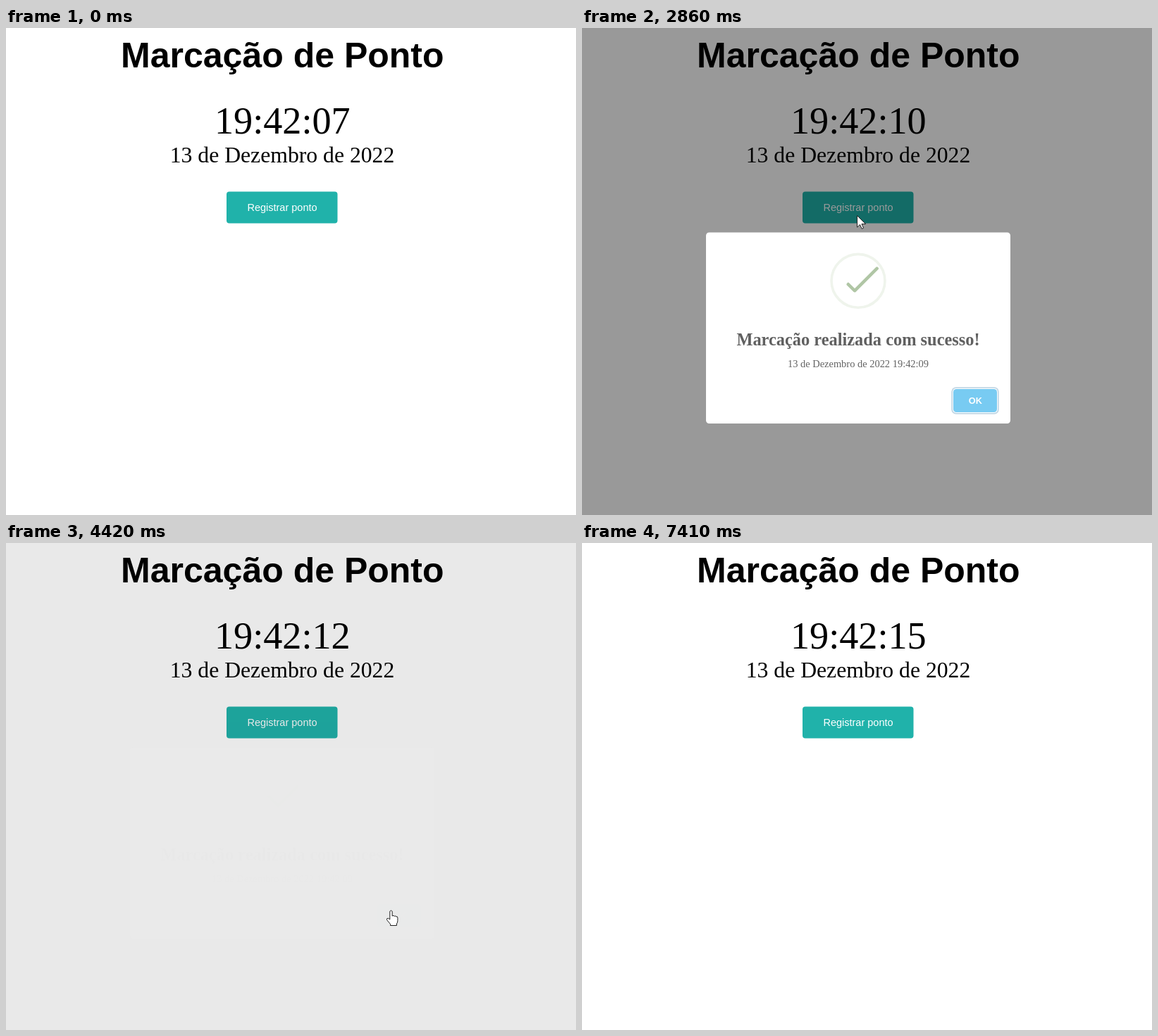
Write an HTML page that moves like this. It is 809 px wide and 692 px high and loops after 7.54 s.

```html
<!DOCTYPE html>
<html lang="pt">
<head>
<meta charset="utf-8">
<title>Marcação de Ponto</title>
<style>
  html, body { margin: 0; width: 100%; height: 100%; overflow: hidden; background: #fff; }
  svg { display: block; width: 809px; height: 692px; }
  text { text-anchor: middle; }
  .sans { font-family: "Liberation Sans", Arial, sans-serif; }
  .serif { font-family: "Liberation Serif", "Times New Roman", serif; }
  .bold { font-weight: bold; }
</style>
</head>
<body>
<svg viewBox="0 0 809 692">
  <text class="sans bold" x="392.3" y="56" font-size="50">Marcação de Ponto</text>
  <text class="serif" id="clock" x="392.3" y="150" font-size="54.2"></text>
  <text class="serif" x="392" y="191" font-size="31.7">13 de Dezembro de 2022</text>
  <rect id="button" x="313" y="232.5" width="157.5" height="45" rx="4"/>
  <text class="sans" x="392" y="260" font-size="14.5" fill="#fff">Registrar ponto</text>

  <g id="overlay">
    <rect width="809" height="692" fill-opacity=".4"/>
    <g id="modal">
      <rect x="176" y="290.5" width="432" height="271.5" rx="4.5" fill="#fff"/>
      <g transform="translate(392 359.3) scale(.904)">
        <circle r="42" fill="none" stroke="#b0c6a5" stroke-width="4"/>
        <g fill="#fff">
          <path d="M0-60A60 60 0 0 0 0 60Z" transform="translate(-13 13) rotate(-45)"/>
          <path id="cover" d="M0-60A60 60 0 0 1 0 60Z"/>
          <rect x="-5" y="-46" width="10" height="92" transform="translate(-10 12) rotate(-45)"/>
        </g>
        <circle r="42" fill="none" stroke="#eff4ec" stroke-width="4"/>
        <g fill="#b0c6a5">
          <rect id="tip" height="5" rx="2"/>
          <rect id="long" height="5" rx="2"/>
        </g>
      </g>
      <text class="serif bold" x="392" y="451" font-size="24.4" fill="#606060">Marcação realizada com sucesso!</text>
      <text class="serif" x="392" y="482" font-size="14.45" fill="#636363">13 de Dezembro de 2022 19:42:09</text>
      <rect x="524.3" y="510.3" width="67.4" height="38.4" rx="6.5" fill="#c2d7e5"/>
      <rect x="526.1" y="512.1" width="63.8" height="34.8" rx="5" fill="#fff"/>
      <rect x="527" y="513" width="62" height="33" rx="4.5" fill="#78cbf2"/>
      <text class="sans bold" x="558.3" y="534" font-size="12.7" fill="#fff">OK</text>
    </g>
  </g>

  <g id="cursor" fill="#fff" stroke="#222" stroke-linejoin="round">
    <path id="arrow" d="M0 0V16.5L4 12.8 6.6 18.7 9 17.6 6.4 11.9H12Z"/>
    <path id="hand" d="M-1.7 13V1.4Q0-1 1.7 1.4V8Q3.8 6.4 4.7 8.4Q6.6 7 7.3 9Q9.3 8.2 9.4 10.5V14.5Q9.4 17.5 8 19V21.5H-1V19.5L-6 13.5Q-6.6 11-3.8 11.3Z"/>
  </g>
</svg>
<script>
const LOOP = 7540, STEP = 130, OPEN = 2256, CLOSE = 4275;
const $ = id => document.getElementById(id);
const clamp = v => Math.min(1, Math.max(0, v));
const mix = (a, b, k) => a + (b - a) * k;

function bezier(x1, y1, x2, y2) {
  const at = (a, b, u) => 3 * a * u * (1 - u) ** 2 + 3 * b * u * u * (1 - u) + u ** 3;
  return x => {
    if (x <= 0) return 0;
    if (x >= 1) return 1;
    let lo = 0, hi = 1;
    for (let i = 0; i < 24; i++) {
      const mid = (lo + hi) / 2;
      if (at(x1, x2, mid) < x) lo = mid; else hi = mid;
    }
    return at(y1, y2, lo);
  };
}
const ease = bezier(.25, .1, .25, 1);
const easeIn = bezier(.42, 0, 1, 1);
const easeInOut = bezier(.42, 0, .58, 1);

// Rows are [position, ...values]; each segment is eased on its own.
function track(rows, p, curve = ease) {
  let i = 1;
  while (i < rows.length - 1 && p > rows[i][0]) i++;
  const a = rows[i - 1], b = rows[i];
  const k = curve(clamp((p - a[0]) / (b[0] - a[0])));
  return a.slice(1).map((v, n) => mix(v, b[n + 1], k));
}

const POP = [[0, .5], [.45, 1.05], [.8, .95], [1, 1]];
const COVER = [[0, -45], [.05, -45], [.12, -405], [1, -405]];
// position, width, left, top
const TIP = [[0, 0, 1, 19], [.54, 0, 2, 17], [.7, 50, -8, 37], [.84, 17, 21, 48], [1, 25, 14, 46]];
// position, width, right, top
const LONG = [[0, 0, 46, 54], [.65, 0, 46, 54], [.84, 55, 0, 35], [1, 47, 8, 38]];
// time, x, y
const MOUSE = [
  [130, 118, 672], [780, 372, 300], [1040, 389, 264], [2800, 389, 264],
  [3640, 546.5, 522], [5000, 546.5, 522], [5590, 480, 662]
];
const REST = [32, 178, 170], HOVER = [26, 126, 120];

function stroke(id, w, left, top, angle) {
  const x = left - 40, y = top - 40;
  const el = $(id);
  el.setAttribute('x', x);
  el.setAttribute('y', y);
  el.setAttribute('width', Math.max(0, w));
  el.setAttribute('transform', `rotate(${angle} ${x + w / 2} ${y + 2.5})`);
}

function drawModal(t) {
  const shown = t > OPEN && t < CLOSE + 300;
  $('overlay').style.display = shown ? '' : 'none';
  if (!shown) return;
  const fade = d => ease((t - OPEN) / d) - ease((t - CLOSE) / d);
  $('overlay').setAttribute('opacity', fade(300));
  $('modal').setAttribute('opacity', fade(200));

  const age = t - OPEN;
  const [s] = track(POP, age / 300);
  $('modal').setAttribute('transform', `translate(392 426) scale(${s}) translate(-392 -426)`);
  const [turn] = track(COVER, age / 4250, easeIn);
  $('cover').setAttribute('transform', `translate(-10 9) rotate(${turn})`);
  const [tw, tl, tt] = track(TIP, age / 750);
  stroke('tip', tw, tl, tt, 45);
  const [lw, lr, lt] = track(LONG, age / 750);
  stroke('long', lw, 80 - lr - lw, lt, -45);
}

function drawCursor(t) {
  const shown = t >= 130 && t < 5650;
  $('cursor').style.display = shown ? '' : 'none';
  const [x, y] = track(MOUSE, t, t < 1040 ? v => v : easeInOut);
  $('cursor').setAttribute('transform', `translate(${x} ${y})`);
  const hand = (t >= 1000 && t < 2800) || (t >= 3500 && t < 5000);
  $('hand').style.display = hand ? '' : 'none';
  $('arrow').style.display = hand ? 'none' : '';
}

function draw(t) {
  const sec = 7 + Math.floor((t + 830) / 1000);
  $('clock').textContent = '19:42:' + String(sec).padStart(2, '0');
  const hover = ease((t - 900) / 250) - ease((t - OPEN) / 300);
  const rgb = REST.map((v, i) => Math.round(mix(v, HOVER[i], hover)));
  $('button').setAttribute('fill', `rgb(${rgb})`);
  drawModal(t);
  drawCursor(t);
}

const start = performance.now();
function frame() {
  const t = (performance.now() - start) % LOOP;
  draw(Math.floor(t / STEP) * STEP);
  requestAnimationFrame(frame);
}
frame();
</script>
</body>
</html>
```
